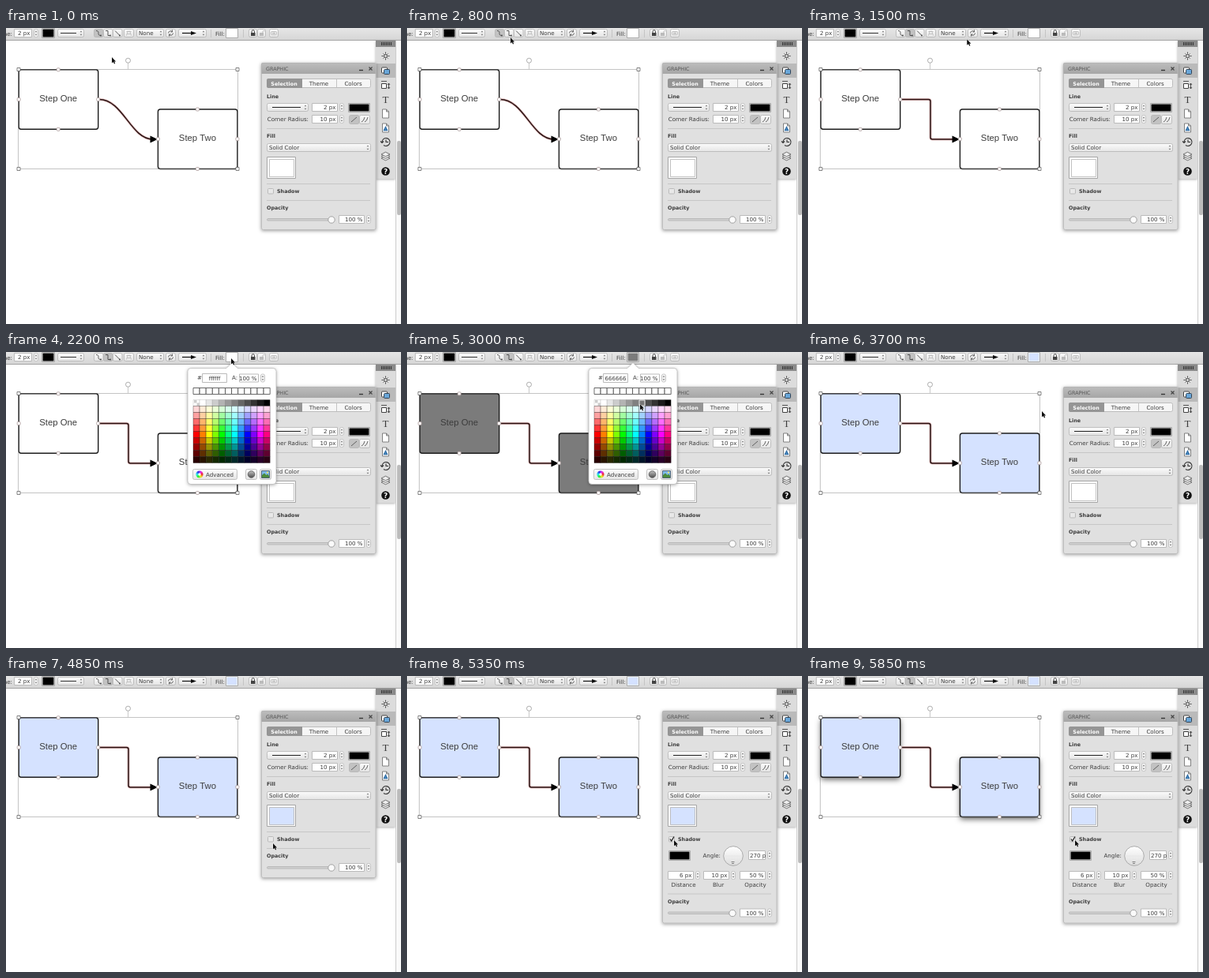
These frames come from a looping animation (500x375 px, 6.75 s). An HTML page with a canvas:

```html
<!DOCTYPE html>
<html lang="en">
<head>
<meta charset="utf-8">
<title>Styling a flow chart</title>
<style>
html, body { margin: 0; width: 100%; height: 100%; overflow: hidden; background: #fff; }
canvas { display: block; }
</style>
</head>
<body>
<canvas id="stage" width="500" height="375"></canvas>
<script>
const ctx = document.getElementById('stage').getContext('2d');
const LOOP = 6750;
const UI = '"DejaVu Sans", sans-serif';
const BLUE = '#d5e2ff';
const POINTER = 'M0 0V7.6L1.8 6 3 8.6 4.2 8 3.1 5.6H5.2Z';

// Pointer stops: time, x, y, downward bow of the path leading there
const pointerStops = [
  [200, 134, 37], [800, 131, 12], [1100, 131, 12], [1950, 285, 8, 4],
  [2300, 285, 8], [2900, 295, 66], [3050, 295, 66], [3300, 296, 75],
  [4250, 296, 75], [4850, 338, 212], [4960, 338, 212], [5150, 338, 208]
];

function pointerAt(t) {
  const next = pointerStops.findIndex(stop => stop[0] > t);
  if (next === 0) return pointerStops[0].slice(1);
  if (next < 0) return pointerStops.at(-1).slice(1);
  const [t0, x0, y0] = pointerStops[next - 1];
  const [t1, x1, y1, bow = 0] = pointerStops[next];
  const u = (t - t0) / (t1 - t0), s = u * u * (3 - 2 * u);
  return [x0 + (x1 - x0) * s, y0 + (y1 - y0) * s + bow * 4 * s * (1 - s)];
}

function box(x, y, w, h, fill, stroke, r = 0, width = 1) {
  ctx.beginPath();
  ctx.roundRect(x, y, w, h, r);
  if (fill) { ctx.fillStyle = fill; ctx.fill(); }
  if (stroke) { ctx.strokeStyle = stroke; ctx.lineWidth = width; ctx.stroke(); }
}

function disc(x, y, r, fill, stroke, width = 1) {
  box(x - r, y - r, 2 * r, 2 * r, fill, stroke, r, width);
}

function path(d, stroke, width = 1, fill, x = 0, y = 0) {
  const p = new Path2D(d);
  ctx.save();
  ctx.translate(x, y);
  if (fill) { ctx.fillStyle = fill; ctx.fill(p); }
  if (stroke) { ctx.strokeStyle = stroke; ctx.lineWidth = width; ctx.stroke(p); }
  ctx.restore();
}

function text(s, x, y, { size = 7.1, bold = false, align = 'left', color = '#3c3c3c', font = UI } = {}) {
  ctx.font = `${bold ? 'bold ' : ''}${size}px ${font}`;
  ctx.textAlign = align;
  ctx.fillStyle = color;
  ctx.fillText(s, x, y);
}

const heading = (s, x, y) => text(s, x, y, { size: 6.4, bold: true });

function fade(y0, y1, top, bottom) {
  const g = ctx.createLinearGradient(0, y0, 0, y1);
  g.addColorStop(0, top);
  g.addColorStop(1, bottom);
  return g;
}

function withShadow(blur, dy, color, draw) {
  ctx.save();
  ctx.shadowBlur = blur;
  ctx.shadowOffsetY = dy;
  ctx.shadowColor = color;
  draw();
  ctx.restore();
}

function button(x, y, w, h, active) {
  box(x + .5, y + .5, w - 1, h - 1, active ? '#c2c2c2' : fade(y, y + h, '#fcfcfc', '#e4e4e4'), '#b4b4b4', 2, .8);
}

function arrows(x, y) {
  path('M-1.4 -1.2L0 -3 1.4 -1.2ZM-1.4 1.2L0 3 1.4 1.2Z', null, 0, '#777', x, y);
}

function spinner(x, y) {
  box(x + .5, y + .5, 5, 10, '#f4f4f4', '#bbb', 2, .8);
  arrows(x + 3, y + 5.5);
}

function field(s, x, y, w) {
  box(x + .5, y + .5, w - 1, 10, '#fff', '#bbb');
  text(s, x + w - 2.5, y + 8.3, { align: 'right' });
  spinner(x + w + 2, y);
}

function dropdown(x, y, w, label = '') {
  button(x, y, w, 11);
  text(label, x + 3, y + 8.2);
  arrows(x + w - 4, y + 5.5);
}

function swatch(x, y, w, h, color) {
  box(x + .5, y + .5, w - 1, h - 1, '#fff', '#aaa');
  box(x + 1.5, y + 1.5, w - 3, h - 3, color);
}

function diagram({ fill, elbow, shadow }) {
  const shapes = [[16.2, 52.8, 'Step One'], [192.4, 103, 'Step Two']];
  for (const [x, y, label] of shapes) {
    if (shadow) withShadow(7, 3, 'rgba(0,0,0,.6)', () => box(x, y, 100.5, 75.5, fill, null, 3));
    box(x, y, 100.5, 75.5, fill, '#1c1c1c', 3, 1.4);
    text(label, x + 50, y + 39.7, { size: 11.3, align: 'center', font: '"Liberation Sans", Arial, sans-serif' });
  }
  const route = elbow
    ? 'M118 90.5H152.5Q155 90.5 155 93V138.5Q155 141 157.5 141H186'
    : 'M118 90.5C148 90.5 158 141 186 141';
  path(route, '#e2bcbc', 3);
  path(route, '#2a1414', 1.5);
  path('M182.5 136.5L192 141 182.5 145.5Z', null, 0, '#000');

  box(15.5, 52.5, 278, 126, null, 'rgba(120,120,120,.55)', 0, .8);
  path('M154.5 44V52', '#bbb', .8);
  disc(154.5, 41.2, 3, '#fff', '#999', .8);
  for (const [x, y] of shapes) {
    for (const [dx, dy] of [[50, 0], [50, 75.5], [0, 37.7], [100.5, 37.7]]) {
      box(x + dx - 2, y + dy - 2, 4, 4, '#fff', '#a99', 1, .8);
    }
  }
  for (const x of [16, 293]) {
    for (const y of [52.5, 178.5]) box(x - 2, y - 2, 4, 4, '#fff', '#666', 0, .8);
  }
}

function toolbar({ fill, elbow }) {
  box(0, 0, 500, 15, fade(0, 15, '#e6e6e6', '#d6d6d6'));
  box(0, 15, 500, 1, '#a4a4a4');
  text('ne:', 8, 9.5, { align: 'right' });
  field('2 px', 10, 1, 23);
  swatch(45, 0, 17, 13, '#000');
  dropdown(65, 1, 34);
  path('M69 6.5H89', '#333', 1);

  const curve = 'M-3 -3C3 -3 -3 3 3 3', bend = 'M-3 -3H0V3H3', straight = 'M-3 -3L3 3';
  [curve, bend, straight].forEach((d, i) => {
    button(111 + 12 * i, 1, 12.5, 11, i === +elbow);
    path(d, '#444', .9, null, 117 + 12 * i, 6.5);
    disc(120 + 12 * i, 9.5, .9, '#444');
  });
  button(149, 1, 13, 11);
  path('M-3 3L-1 -3M-3 -2H3M1 -3L3 3M-2 1H2', '#bbb', .9, null, 155.5, 6.5);
  dropdown(165, 1, 35, 'None');
  button(202, 1, 13, 11);
  path('M-3 0A3 3 0 0 1 2 -2M3 0A3 3 0 0 1 -2 2M2 -4V-1.5H0M-2 4V1.5H0', '#555', .9, null, 208.5, 6.5);
  dropdown(218, 1, 36);
  path('M223 6.5H235', '#111', 1.2);
  path('M234 4L241 6.5 234 9Z', null, 0, '#111');
  path('M259.5 2V12M300.5 2V12', '#c4c4c4');
  text('Fill:', 265, 9.5);
  swatch(278, 0, 16, 13, fill);

  button(307, 1, 11, 11);
  button(318, 1, 11, 11);
  box(310, 6, 5.5, 4, '#444');
  path('M311 6V4.5A1.7 1.7 0 0 1 314.5 4.5V6', '#444');
  box(321, 6, 5, 4, '#bbb');
  path('M325 6V4.5A1.6 1.6 0 0 1 328 4.5', '#bbb');
  button(333, 1, 12, 11);
  box(335.5, 4.5, 7, 4, null, '#bbb', 1);
  path('M337 6.5H341', '#aaa');
}

function dock() {
  withShadow(3, 1, 'rgba(0,0,0,.3)', () => box(468, 16, 25, 175, '#dcdcdc'));
  box(468, 16, 25, 8, '#8a8a8a');
  for (let x = 475; x < 488; x += 2) box(x, 18, 1, 4, '#333');
  box(468, 45, 25, 18, '#bababa');

  path('M0 -5V-3M0 3V5M-5 0H-3M3 0H5M-3 -3L-2 -2M3 3L2 2M3 -3L2 -2M-3 3L-2 2', '#444', 1, null, 480.5, 35.5);
  disc(480.5, 35.5, 2, null, '#444');
  box(475.5, 50, 7, 7, '#fff', '#444', 1);
  box(478.5, 52.5, 7, 6, '#69a6d8', '#345', 1);
  box(475.5, 70.5, 6, 6, '#fff', '#444');
  path('M475 67.5H482M484.5 70V77M483 72L484.5 70 486 72M483 75L484.5 77 486 75', '#444', .9);
  text('T', 480.5, 95, { size: 13, align: 'center', font: '"Liberation Serif", serif' });
  const page = 'M-4 -5.5H1L4 -2.5V5.5H-4ZM1 -5.5V-2.5H4';
  path(page, '#666', .8, '#fff', 480.5, 108.5);
  path(page, '#666', .8, '#fff', 480.5, 126.5);
  path('M-2 3L0 -1 2 3Z', '#2d6ca5', 1.3, '#69a6d8', 480.5, 126.5);
  path('M-5 0A5 5 0 1 1 -3 4M-7 -1L-5 1 -3 -1M0 -3V0H3', '#333', 1.1, null, 481, 144.5);
  for (const y of [165, 162.5, 160]) path('M-5.5 0L0 -2.8 5.5 0 0 2.8Z', '#555', .8, '#eee', 480.5, y);
  disc(480.5, 181.5, 5.3, '#111');
  text('?', 480.5, 185, { size: 9, bold: true, align: 'center', color: '#fff' });

  path('M493.5 16V375', '#ccc');
  box(494, 16, 6, 359, '#fafafa');
  box(495, 143, 5, 94, '#bcbcbc', null, 2);
}

const rule = y => path(`M330 ${y}.5H461`, '#c6c6c6');

function panel({ panelFill, checked, shadowOptions }) {
  const drop = shadowOptions ? 57.5 : 0;
  withShadow(4, 1, 'rgba(0,0,0,.4)', () => box(323, 44, 145.5, 212 + drop, '#e0e0e0', null, 2));
  box(323, 44, 145.5, 14, fade(44, 58, '#bdbdbd', '#a6a6a6'), null, [2, 2, 0, 0]);
  box(323.5, 44.5, 144.5, 211 + drop, null, '#b4b4b4', 2, .8);
  text('GRAPHIC', 329, 53.6, { size: 6.4, color: '#555' });
  path('M447 53.5H452', '#333', 1.3);
  path('M459.5 49.5L463.5 53.5M463.5 49.5L459.5 53.5', '#444', 1.1);

  box(330.5, 64.5, 131, 11, '#f6f6f6', '#bdbdbd', 2);
  box(330, 64, 45, 12, '#959595', null, [2, 0, 0, 2]);
  path('M418.5 65V75', '#c4c4c4');
  text('Selection', 352, 72.5, { size: 6.4, bold: true, align: 'center', color: '#fff' });
  text('Theme', 396, 72.5, { align: 'center' });
  text('Colors', 439.5, 72.5, { align: 'center' });

  heading('Line', 330, 88.5);
  dropdown(330, 95, 53);
  path('M337 100.5H373', '#222', 1.1);
  field('2 px', 387, 95, 33);
  swatch(433, 95, 28, 12, '#000');
  text('Corner Radius:', 383, 118.3, { align: 'right' });
  field('10 px', 387, 110, 33);
  button(434, 110, 13.5, 12, true);
  button(447, 110, 14, 12);
  path('M437 119L444 113M450 119Q453 118 454 113M454 119Q457 118 458 113', '#555', .9);
  rule(127);

  heading('Fill', 330, 138.8);
  dropdown(330, 146, 132, 'Solid Color');
  box(330.5, 163.5, 36, 27, '#fff', '#a5a5a5');
  box(333.5, 166.5, 31, 22, panelFill, '#b4b4b4', 0, .8);
  rule(197);

  box(331.5, 203.5, 7, 6.5, '#e8e8e8', '#bbb', 1);
  if (checked) path('M333 206.5L334.7 209 338 203.5', '#222', 1.3);
  heading('Shadow', 343, 209.3);

  if (shadowOptions) {
    swatch(331, 221, 28, 13, '#000');
    text('Angle:', 397, 229.5, { align: 'right' });
    disc(413, 228, 12.3, fade(216, 240, '#fff', '#ddd'), '#aaa');
    path('M401 228H425', '#e2e2e2', .7);
    path('M410.5 235.5H414.5M411 237.5H414', '#777', .9);
    ctx.save();
    ctx.beginPath();
    ctx.rect(432, 221, 22, 13);
    ctx.clip();
    box(432.5, 221.5, 21, 11, '#fff', '#bbb');
    text('270 px', 434, 229.8);
    ctx.restore();
    spinner(456, 221);
    field('6 px', 330, 247, 33);
    field('10 px', 375, 247, 33);
    field('50 %', 421, 247, 33);
    text('Distance', 350, 267, { align: 'center' });
    text('Blur', 394, 267, { align: 'center' });
    text('Opacity', 441, 267, { align: 'center' });
  }

  ctx.save();
  ctx.translate(0, drop);
  rule(218);
  heading('Opacity', 330, 230.3);
  box(330.5, 241.5, 82, 2.5, '#d0d0d0', '#b0b0b0', 1.5, .8);
  disc(412, 243, 4.2, '#fafafa', '#999', .9);
  field('100 %', 421, 237, 33);
  ctx.restore();
}

function picker({ hex, gray }) {
  withShadow(4, 1, 'rgba(0,0,0,.35)', () => {
    path('M234 20.5H279L286 13.5 293 20.5H338Q342 20.5 342 24.5V163.5Q342 167.5 338 167.5H234Q230 167.5 230 163.5V24.5Q230 20.5 234 20.5Z', null, 0, '#fff');
  });
  path('M234 20.5H279L286 13.5 293 20.5H338Q342 20.5 342 24.5V163.5Q342 167.5 338 167.5H234Q230 167.5 230 163.5V24.5Q230 20.5 234 20.5Z', '#bbb', .8);
  text('#', 242, 35);
  box(248.5, 27.5, 31, 11, '#fff', '#bbb');
  text(hex, 264, 35.7, { align: 'center' });
  text('A:', 286, 34.5);
  field('100 %', 295, 27.5, 25);

  const cell = 8.1;
  for (let col = 0; col < 12; col++) {
    const x = 237 + col * cell;
    box(x, 45.5, cell, 8, '#fff', '#444', 0, .8);
    for (let row = 0; row < 10; row++) {
      const level = Math.round(255 - 25.5 * (col - 1));
      const color = row ? `hsl(${col * 30} 100% ${92 - 10.5 * (row - 1)}%)`
        : col ? `rgb(${level} ${level} ${level})` : '#fff';
      box(x, 60.5 + row * 8, cell, 8, color, row ? 'rgba(0,0,0,.4)' : 'rgba(0,0,0,.15)', 0, .8);
    }
  }
  box(238, 61, 3.5, 3.5, '#ccc');
  box(241.5, 64.5, 3.5, 3.5, '#ccc');
  if (gray) box(294, 61, 7, 7, '#777', '#eee');

  button(236, 148, 57, 14);
  const wheel = ctx.createConicGradient(0, 245, 155);
  for (let i = 0; i <= 6; i++) wheel.addColorStop(i / 6, `hsl(${i * 60} 85% 55%)`);
  disc(245, 155, 4.6, wheel);
  disc(245, 155, 1.7, '#fff');
  text('Advanced', 253, 157.5);
  button(303, 148, 15, 14);
  disc(310.5, 155, 4.3, fade(150, 160, '#ccc', '#444'), '#555', .8);
  button(321, 148, 15, 14);
  box(323.5, 150.5, 10, 9, '#7db8e8', '#345', 0, .8);
  path('M324 159V156L327 153.5 329.5 156 331 154.5 333 157V159Z', null, 0, '#4b8b3b');
  disc(331, 152.6, 1.1, '#ffe45c');
}

function stepTime(t) {
  if (t < 4300) return Math.floor(t / 100) * 100;
  if (t < 4850) return Math.floor(t / 50) * 50;
  return Math.floor((t - 50) / 100) * 100 + 50;
}

function render(now) {
  const t = stepTime(now % LOOP);
  const blue = t >= 3300, gray = t >= 2900 && !blue;
  const state = {
    gray,
    fill: blue ? BLUE : gray ? '#7b7b7b' : '#fff',
    hex: blue ? 'd6e3ff' : gray ? '666666' : 'ffffff',
    panelFill: t >= 3900 ? BLUE : '#fff',
    elbow: t >= 1000,
    checked: t >= 5350,
    shadowOptions: t >= 5350,
    shadow: t >= 5450
  };
  box(0, 0, 500, 375, '#fff');
  diagram(state);
  toolbar(state);
  dock();
  panel(state);
  if (t >= 2100 && t < 3500) picker(state);
  const [x, y] = pointerAt(t);
  path(POINTER, '#fff', 1, null, x, y);
  path(POINTER, null, 0, '#111', x, y);
}

const start = performance.now();
function tick() {
  render(performance.now() - start);
  requestAnimationFrame(tick);
}
tick();
</script>
</body>
</html>
```
